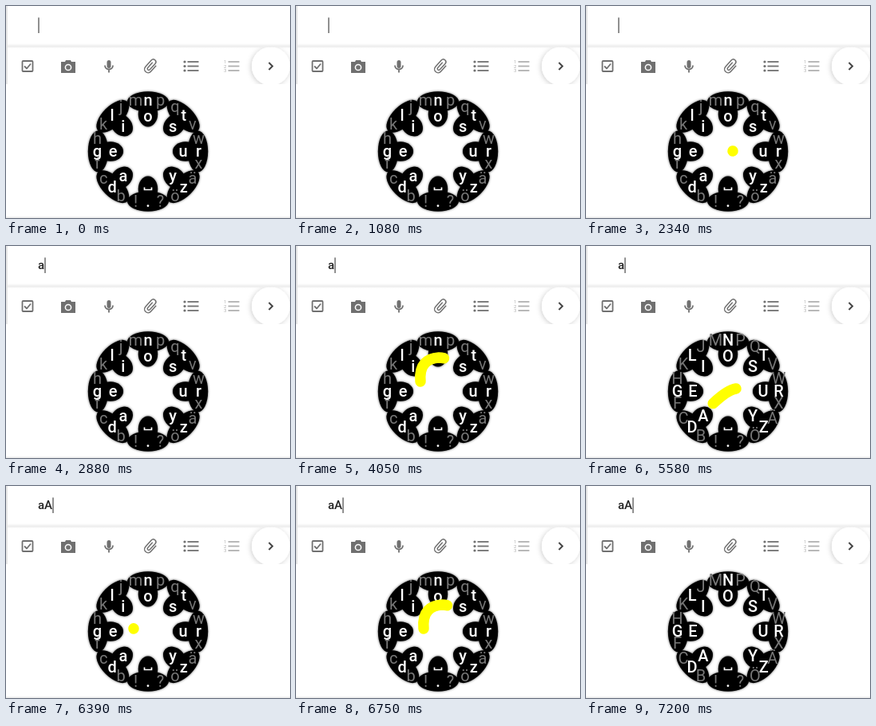
These frames come from a looping animation (356 px wide and 266 px high, 8 s). An HTML page:

```html
<!DOCTYPE html>
<html lang="en">
<head>
<meta charset="utf-8">
<title>Flower keyboard</title>
<style>
  html, body { margin: 0; width: 100%; height: 100%; overflow: hidden; background: #fff; }
  svg { display: block; width: 356px; height: 266px; }
  text { font-family: Roboto, "Liberation Sans", sans-serif; }
  #typed { font-size: 15px; font-weight: 500; fill: #222; }
  #keys { filter: blur(.4px); }
  #keys text { font-size: 20px; font-weight: 500; text-anchor: middle; fill: #fff; }
  #keys .side { font-weight: 400; fill: #777; }
  #petals { filter: blur(.5px) drop-shadow(0 0 1.5px rgba(0, 0, 0, .65)); }
  #icons { fill: none; stroke: #707070; stroke-width: 1.8; filter: blur(.3px); }
  #icons .solid { fill: #707070; stroke: none; }
  #icons text { font-size: 6px; fill: #707070; stroke: none; }
  #trail { fill: none; stroke: #ff0; stroke-width: 13.5; stroke-linecap: round; stroke-linejoin: round; }
</style>
</head>
<body>
<svg viewBox="0 0 356 266">
  <defs>
    <linearGradient id="fold" x2="0" y2="1">
      <stop stop-color="#fff"/>
      <stop offset=".65" stop-color="#ececec"/>
      <stop offset="1" stop-color="#fff"/>
    </linearGradient>
    <clipPath id="bar"><path d="M0 52H356V98H0Z"/></clipPath>
    <filter id="soft" x="-30%" y="-30%" width="160%" height="160%">
      <feDropShadow dx="-1" dy="1" stdDeviation="3" flood-opacity=".2"/>
    </filter>
  </defs>

  <path fill="#fff" d="M0 0H356V266H0Z"/>
  <path fill="url(#fold)" d="M0 47H356V53H0Z"/>
  <path fill="#e6e6e6" d="M0 0H2V98H0Z"/>
  <path fill="#ececec" d="M0 264.500H356V266H0Z"/>

  <text id="typed" x="40" y="28.500"></text>
  <path id="caret" stroke="#555" stroke-width="1.300" d="M0 14.500V34"/>

  <g id="icons">
    <g transform="translate(27 75.500)">
      <rect x="-6.500" y="-6.500" width="13" height="13" rx="1"/>
      <path d="M-4 0L-1 3L4 -3"/>
    </g>
    <g transform="translate(78 76)">
      <path class="solid" d="M-9 -6H-4L-3 -8H3L4 -6H9V8H-9Z"/>
      <circle r="3.600" cy="1" stroke="#fff" stroke-width="1.500"/>
    </g>
    <g transform="translate(129 75.500)">
      <path d="M0 -5V0" stroke-width="5" stroke-linecap="round"/>
      <path d="M-5 -1A5 5 0 0 0 5 -1M0 4V8"/>
    </g>
    <g transform="translate(181.500 75.500) rotate(42)">
      <path d="M4.500 -5V5A4.500 4.500 0 0 1 -4.500 5V-6A3 3 0 0 1 2 -6V4A1.500 1.500 0 0 1 -1.500 4V-5" stroke-width="1.500"/>
    </g>
  </g>
  <g clip-path="url(#bar)">
    <circle cx="332" cy="75.500" r="24" fill="#fff" filter="url(#soft)"/>
    <path d="M329.500 71L334 75.500L329.500 80" fill="none" stroke="#444" stroke-width="2"/>
  </g>

  <g id="petals"></g>
  <g id="keys"></g>
  <path d="M173.500 227.500V230.500H182.500V227.500" fill="none" stroke="#fff" stroke-width="1.700"/>
  <path id="trail" pathLength="1"/>
</svg>

<script>
const LOOP = 8000, STEP = 90;
const CX = 178, CY = 182.5;
const $ = id => document.getElementById(id);

function add(parent, tag, attrs) {
  const el = document.createElementNS("http://www.w3.org/2000/svg", tag);
  for (const k in attrs) el.setAttribute(k, attrs[k]);
  return parent.appendChild(el);
}

// Bulleted list, then a paler numbered one
[232, 283].forEach((x, numbered) => {
  const g = add($("icons"), "g", { transform: `translate(${x} 75.500)`, opacity: numbered ? 0.55 : 1 });
  for (let row = -1; row <= 1; row++) {
    const y = row * 5.5;
    add(g, "path", { d: `M-4.500 ${y}H9.500` });
    if (numbered) add(g, "text", { x: -10, y: y + 2 }).textContent = row + 2;
    else add(g, "circle", { class: "solid", cx: -8, cy: y, r: 1.6 });
  }
});

// Clockwise from the top: first side, middle, second side, inner
const petals = ["mnpo", "qtvs", "wrxu", "äzöy", "?.! ", "bdca", "fghe", "klji"];
const keys = [];

petals.forEach((chars, i) => {
  const a = i * Math.PI / 4, sin = Math.sin(a), cos = Math.cos(a);
  const g = add($("petals"), "g", { transform: `translate(${CX} ${CY}) rotate(${i * 45})` });
  add(g, "ellipse", { cy: -62.5, rx: 26, ry: 12.7 });
  add(g, "ellipse", { cy: -47, rx: 12.2, ry: 16 });
  [...chars].forEach((ch, j) => {
    const inner = j === 3;
    const along = inner ? 0 : (j - 1) * 15.5;
    const out = inner ? 44 : 63.5;
    const el = add($("keys"), "text", {
      x: CX + along * cos + out * sin,
      y: CY + along * sin - out * cos + 6.3,
      class: along ? "side" : "main"
    });
    keys.push([el, ch]);
  });
});

// Gestures relative to where the finger lands; pace above 1 speeds up
const swipe = { d: "m0 0q-14 2 -41 31", steps: 6, pace: 1 };
const circle = { d: "m0 0c-2 -22 9 -29 23 -30c20 0 25 21 29 40c6 28 -20 33 -35 14", steps: 9, pace: 1.4 };
const strokes = [
  { shape: swipe, x: 184, y: 182, from: 2340, to: 2880 },
  { shape: circle, x: 156, y: 170, from: 3690, to: 4590 },
  { shape: swipe, x: 188, y: 179, from: 5220, to: 5850 },
  { shape: circle, x: 160, y: 179, from: 6390, to: 7200 }
];
const [typeLower, shiftOn, typeUpper, shiftAgain] = strokes.map(s => s.to);

function drawTrail(t) {
  const s = strokes.find(s => t >= s.from && t < s.to);
  $("trail").setAttribute("visibility", s ? "visible" : "hidden");
  if (!s) return;
  const p = Math.floor((t - s.from) / STEP) / s.shape.steps;
  const shown = Math.max(0.001, Math.min(1, p) ** s.shape.pace);
  $("trail").setAttribute("d", s.shape.d);
  $("trail").setAttribute("transform", `translate(${s.x} ${s.y})`);
  $("trail").setAttribute("stroke-dasharray", `${shown} 2`);
}

let isUpper = null;
function setCase(upper) {
  if (upper === isUpper) return;
  isUpper = upper;
  for (const [el, ch] of keys) el.textContent = upper ? ch.toUpperCase() : ch;
}

function draw(t) {
  const [text, caret] = t < typeLower ? ["", 41] : t < typeUpper ? ["a", 49] : ["aA", 59];
  $("typed").textContent = text;
  $("caret").setAttribute("transform", `translate(${caret} 0)`);
  setCase((t >= shiftOn && t < typeUpper) || t >= shiftAgain);
  drawTrail(t);
}

const begin = performance.now();
function tick() {
  draw((performance.now() - begin) % LOOP);
  requestAnimationFrame(tick);
}
tick();
</script>
</body>
</html>
```
